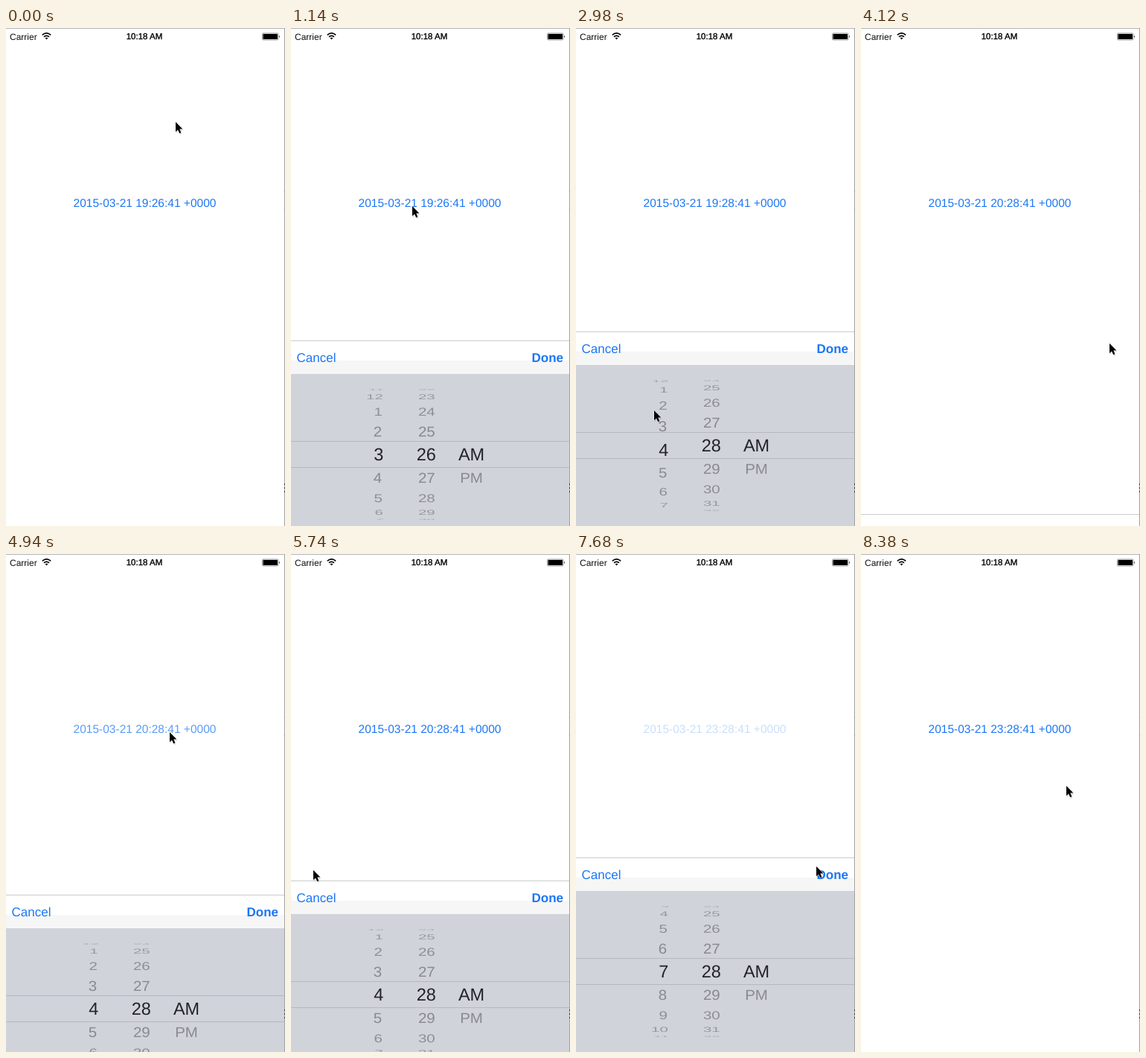
An HTML page that plays this animation: 375 px wide and 668 px high, repeating every 8.68 s.

```html
<!DOCTYPE html>
<html lang="en">
<head>
<meta charset="utf-8">
<title>Time picker</title>
<style>
html, body { margin: 0; width: 100%; height: 100%; overflow: hidden; background: #fff; }
svg {
  display: block; width: 375px; height: 668px;
  font-family: "Liberation Sans", Arial, sans-serif;
  text-rendering: geometricPrecision;
}
</style>
</head>
<body>
<svg viewBox="0 0 375 668" width="375" height="668">
  <defs>
    <clipPath id="band"><rect y="136" width="375" height="34"/></clipPath>
    <clipPath id="rest"><path d="M0 45H375V135H0ZM0 171H375V262H0Z"/></clipPath>
  </defs>
  <rect width="375" height="668" fill="#fff"/>

  <text x="5" y="15.5" font-size="12" fill="#111">Carrier</text>
  <g fill="none" stroke="#000" stroke-width="1.7">
    <path d="M48.8 9.4Q54.5 4.4 60.2 9.4"/>
    <path d="M51 11.8Q54.5 8.8 58 11.8"/>
  </g>
  <path d="M52.6 13.4Q54.5 12 56.4 13.4L54.5 15.6Z"/>
  <text x="186" y="15.3" font-size="11.5" text-anchor="middle" stroke="#000" stroke-width=".35">10:18 AM</text>
  <rect x="344.5" y="7" width="21.5" height="9" rx="1.5" fill="none" stroke="#777" stroke-width=".8"/>
  <rect x="345.5" y="8" width="19.5" height="7" rx=".6"/>
  <path d="M367 9.7Q368.8 11.5 367 13.3Z"/>

  <text id="title" x="186.5" y="239.7" font-size="15.5" text-anchor="middle" fill="#1c76f5"></text>

  <g id="panel">
    <rect width="375" height="262" fill="#fff"/>
    <rect y="27" width="375" height="18" fill="#f6f6f6"/>
    <rect width="375" height="1" fill="#ccc"/>
    <text x="7.5" y="29" font-size="17" fill="#1c76f5">Cancel</text>
    <text x="366" y="29" font-size="17" font-weight="bold" text-anchor="end" fill="#1c76f5">Done</text>
    <rect y="45" width="375" height="217" fill="#d0d3da"/>
    <rect y="135" width="375" height="1" fill="#b5b8be"/>
    <rect y="170" width="375" height="1" fill="#b5b8be"/>
    <g id="wheel" clip-path="url(#rest)" fill="#111" font-size="20.5"></g>
    <g id="lens" clip-path="url(#band)" fill="#222327" font-size="23.5"></g>
  </g>

  <rect width="375" height="1" fill="#b4b4b4"/>
  <rect x="374" width="1" height="668" fill="#a2a2a2"/>
  <path d="M374 219h1M374 243h1" stroke="#4a90e8"/>
  <path d="M374.5 611v14" stroke="#333" stroke-dasharray="2 3"/>

  <g id="cursor">
    <path d="M0 0V14L3.2 11.2L5.3 16L8 14.8L6 10.2H10Z" transform="translate(.5 1.2)" opacity=".15"/>
    <path d="M0 0V13.2L3 10.4L5.2 15.2L7.4 14.2L5.3 9.6H9.4Z" stroke="#fff" paint-order="stroke"/>
  </g>
</svg>
<script>
const LOOP = 8680;
const STEP = 0.362, RADIUS = 87.5, MID = 153, ZOOM = 1.15;
const $ = id => document.getElementById(id);
const clamp = v => Math.min(1, Math.max(0, v));
const smooth = u => u * u * (3 - 2 * u);
const easeOut = u => 1 - (1 - u) ** 2;
const span = (t, a, b) => clamp((t - a) / (b - a));

const home = [228, 126];
const moves = [
  { from: 200, to: 740, x: 163, y: 239, bow: [-95, -70] },
  { from: 1200, to: 1580, x: 283, y: 423 },
  { from: 1760, to: 1960, x: 194, y: 566 },
  { from: 2160, to: 2360, x: 194, y: 506 },
  { from: 2500, to: 2720, x: 106, y: 552 },
  { from: 2780, to: 2960, x: 105, y: 513 },
  { from: 3320, to: 3720, x: 334, y: 423 },
  { from: 4150, to: 4660, x: 220, y: 239 },
  { from: 5020, to: 5500, x: 30, y: 424 },
  { from: 5850, to: 6280, x: 164, y: 244 },
  { from: 6500, to: 6800, x: 138, y: 502 },
  { from: 6960, to: 7180, x: 138, y: 405 },
  { from: 7420, to: 7680, x: 323, y: 419 },
  { from: 8050, to: 8260, x: 276, y: 311 }
];
const slides = [[967, 3960], [4832, 5720], [6438, 8030]];
const titles = [[0, "19:26"], [2560, "19:28"], [3380, "20:28"], [7660, "23:28"]];
const fades = [...slides, ...titles.slice(1)].map(s => s[0]);

function cursorAt(t) {
  let [x, y] = home;
  for (const m of moves) {
    const u = span(t, m.from, m.to), e = smooth(u), arc = Math.sin(Math.PI * u);
    const [bx, by] = m.bow || [0, 0];
    x += (m.x - x) * e + bx * arc;
    y += (m.y - y) * e + by * arc;
  }
  return [x, y];
}

// critically damped spring
function spring(ms) {
  const w = Math.max(0, ms) * 0.028;
  return 1 - (1 + w) * Math.exp(-w);
}
const shownAt = t => slides.reduce((sum, [up, down]) => sum + spring(t - up) - spring(t - down), 0);

function alphaAt(t) {
  const last = Math.max(-LOOP, ...fades.filter(f => f <= t));
  return 0.2 + 0.8 * smooth(span(t, last, last + 180));
}

const hourAt = t => 3 + easeOut(span(t, 2780, 3120)) + 3 * easeOut(span(t, 6960, 7180));
const minuteAt = t => 26 + 2 * easeOut(span(t, 2160, 2360));

const columns = [
  { x: 122, big: 124.3, anchor: "end", drift: 3.5, at: hourAt, label: n => (n + 11) % 12 + 1 },
  { x: 182.3, big: 181.8, anchor: "middle", drift: 0, at: minuteAt, label: n => n },
  { x: 242.5, big: 242.5, anchor: "middle", drift: 0, at: () => 0, label: n => ["AM", "PM"][n] || "" }
];

function makeRows(group, anchor, count) {
  return Array.from({ length: count }, () => {
    const el = document.createElementNS("http://www.w3.org/2000/svg", "text");
    el.setAttribute("text-anchor", anchor);
    return group.appendChild(el);
  });
}
for (const col of columns) {
  col.rows = makeRows($("wheel"), col.anchor, 11);
  col.lens = makeRows($("lens"), col.anchor, 5);
}

function drawRows(rows, col, value, zoom) {
  const first = Math.round(value) - (rows.length - 1) / 2, big = zoom > 1;
  rows.forEach((el, i) => {
    const n = first + i, angle = (n - value) * STEP, depth = Math.cos(angle);
    const x = big ? col.big : col.x + col.drift * (1 - depth);
    const y = MID + RADIUS * zoom * Math.sin(angle);
    el.textContent = depth > 0.07 ? col.label(n) : "";
    el.setAttribute("y", big ? 8.4 : 7.4);
    el.setAttribute("transform", `translate(${x} ${y}) scale(1 ${depth})`);
    el.setAttribute("opacity", big ? 1 : 0.14 + 0.24 * Math.sqrt(Math.max(0, depth)));
  });
}

function draw(t) {
  $("cursor").setAttribute("transform", `translate(${cursorAt(t)})`);
  $("panel").setAttribute("transform", `translate(0 ${668 - Math.round(261 * shownAt(t))})`);

  const clock = titles.filter(s => t >= s[0]).pop()[1];
  $("title").textContent = `2015-03-21 ${clock}:41 +0000`;
  $("title").setAttribute("opacity", alphaAt(t));

  for (const col of columns) {
    const value = col.at(t);
    drawRows(col.rows, col, value, 1);
    drawRows(col.lens, col, value, ZOOM);
  }
}

const begin = performance.now();
function tick() {
  draw(Math.max(0, performance.now() - begin) % LOOP);
  requestAnimationFrame(tick);
}
tick();
</script>
</body>
</html>
```
